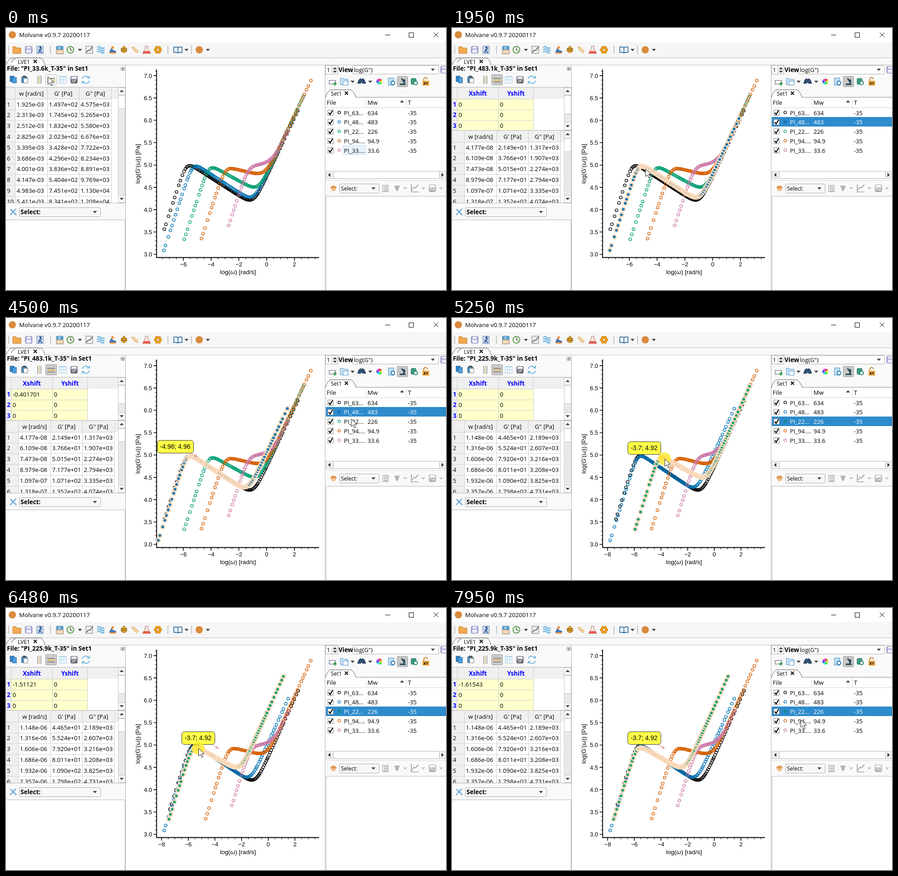
An HTML page with a canvas that plays this animation: 970x577 px, repeating every 8000 ms.

```html
<!DOCTYPE html>
<html lang="en">
<head>
<meta charset="utf-8">
<title>Rheology plot</title>
<style>
html,body{margin:0;width:100%;height:100%;overflow:hidden;background:#fff}
svg,canvas{position:absolute;left:0;top:0}
svg svg{overflow:hidden}
text{font:13.2px "Open Sans","Noto Sans",sans-serif;white-space:pre}
.b{font-weight:700;font-size:13.5px}
.s{font-size:12px}
.t{font-size:8px;font-weight:700}
.m{text-anchor:middle}
.e{text-anchor:end}
.blue{fill:#00f}
.white{fill:#fff}
.p{font:13px "Liberation Sans",Arial,sans-serif}
.l{font-size:13.5px}
.n{font-size:14px}
</style>
</head>
<body>
<template id="file4">
1.925e-03 1.497e+02 4.575e+03
2.313e-03 1.745e+02 5.265e+03
2.512e-03 1.832e+02 5.580e+03
2.825e-03 2.023e+02 6.676e+03
3.395e-03 3.428e+02 7.722e+03
3.686e-03 4.296e+02 8.234e+03
4.001e-03 3.836e+02 8.891e+03
4.147e-03 5.404e+02 9.769e+03
4.983e-03 7.451e+02 1.130e+04
5.411e-03 8.341e+02 1.208e+04
</template>
<template id="file1">
4.177e-08 2.149e+01 1.317e+03
6.109e-08 3.766e+01 1.907e+03
7.473e-08 5.015e+01 2.274e+03
8.979e-08 7.177e+01 2.794e+03
1.097e-07 1.071e+02 3.335e+03
1.318e-07 1.352e+02 4.074e+03
</template>
<template id="file2">
1.148e-06 4.465e+01 2.189e+03
1.316e-06 5.524e+01 2.607e+03
1.606e-06 7.920e+01 3.216e+03
1.686e-06 8.011e+01 3.208e+03
1.932e-06 1.090e+02 3.825e+03
2.357e-06 1.798e+02 4.731e+03
</template>
<svg width="970" height="577"><g id="ui"></g><g id="table"></g><g id="list"></g><g id="axis"></g></svg>
<canvas id="plot" width="970" height="577"></canvas>
<svg id="over" width="970" height="577"></svg>
<script>
const $ = id => document.getElementById(id);
const T = (x, y, s, c = '', a = '') => `<text x="${x}" y="${y}" class="${c}" ${a}>${s}</text>`;
const R = (x, y, w, h, f = 'none', s = 'none', r = 0) =>
  `<rect x="${x}" y="${y}" width="${w}" height="${h}" rx="${r}" fill="${f}" stroke="${s}"/>`;
const P = (d, s = '#000', w = 1, f = 'none') => `<path d="${d}" fill="${f}" stroke="${s}" stroke-width="${w}"/>`;
const C = (x, y, r, f = 'none', s = 'none', w = 1) =>
  `<circle cx="${x}" cy="${y}" r="${r}" fill="${f}" stroke="${s}" stroke-width="${w}"/>`;
const rep = (n, f) => Array.from({length: n}, (_, i) => f(i)).join('');
const down = (x, y, f = '#444') => P(`M${x - 4.5} ${y - 2}h9l-4.5 5z`, 'none', 0, f);
const up = (x, y, f = '#444') => P(`M${x - 4.5} ${y + 2}h9l-4.5-5z`, 'none', 0, f);
const grip = x => P(`M${x} 39v18`, '#c4c4c4', 2);
const cross = (x, y, n, w = 1) => P(`M${x} ${y}l${n} ${n}m0-${n}l-${n} ${n}`, '#000', w);
const line = (d, c = '#b4b4b4') => P(d, c);
const combo = (x, y, w, h, f = '#f8f8f8') => R(x + .5, y + .5, w, h, f, '#acacac', 2) + down(x + w - 12, y + h / 2);
const disk = (x, y, s = '', f = '#b5b5e2', ink = '#7474a8') => R(x - 7.5, y - 7.5, 15, 15, f, ink, 2) +
  R(x - 4, y - 7, 8, 4, '#fff') + (s ? R(x - 6, y - 1, 12, 8, ink) + T(x, y + 6, s, 't m white') : R(x - 5, y, 10, 7, '#eef'));

const COLORS = ['#000', '#0072b2', '#009e73', '#d55e00', '#cc79a7'];
const MASS = ['634', '483', '226', '94.9', '33.6'];
const NAMES = ['PI_63...', 'PI_48...', 'PI_22...', 'PI_94....', 'PI_33....'];
const FILES = {4: '33.6', 1: '483.1', 2: '225.9'};

// per curve: first x, last x, foot of the rise, plateau height, plateau slope, foot of the glassy rise
const MELTS = [
  [349, 647, 346.7, 360.6, .64, 614.5],
  [348, 638, 361, 353.5, .65, 612],
  [393, 658, 398, 329.3, .55, 612],
  [431, 674, 435.5, 309, .25, 612],
  [491, 625, 486, 307, -.1, 614]
];
const soft = (a, b, k) => Math.max(a, b) + k * Math.log1p(Math.exp(-Math.abs(a - b) / k));

function sample([x0, x1, foot, level, slope, glassy], i) {
  const height = x => {
    const rise = 450 - 3.05 * (x - foot);
    const plateau = level + slope * (x - 500);
    const glass = 243 - 2.12 * (x - glassy);
    return soft(rise, -soft(-plateau, -glass, 20), 18);
  };
  let seed = 911 + 77 * i;
  const rnd = () => (seed = (seed * 16807) % 2147483647) / 2147483647;
  const pts = [];
  for (let x = x0; x <= x1;) {
    pts.push([(x - 574.6) / 30.6, height(x)]);
    const end = Math.max(0, Math.abs((x - x0) / (x1 - x0) - .5) - .25) * 4;
    x += (2.2 + 2.8 * end) * (.7 + .6 * rnd());
  }
  return pts;
}
const CURVES = MELTS.map(sample);

function mainBar() {
  let s = R(0, 0, 970, 577, '#f9f9f9') + R(0, 0, 970, 31, '#fff') + R(0, 31, 970, 34, '#f6f6f6');
  s += C(14, 15, 8, '#d98a3c') + T(29, 20, 'Molvane v0.9.7 20200117');
  s += P('M836 15.5h11') + R(888.5, 10.5, 10, 10, 'none', '#000') + cross(943, 10, 10);
  s += line('M0 65.5h970M0 81.5h970', '#c2c2c2') + [6, 98, 357, 409].map(grip).join('');
  s += P('M15 41h7l2 3h9v12h-18z', '#c07a28', 1, '#f2a950') + disk(50, 48);
  s += R(68, 40, 14, 16, '#cfdcf0', '#5b7fae') + C(76, 43, 2.3, '#234a86') + P('M79 46l-5 2-2 7m2-7l5 7', '#234a86', 2);
  s += R(111, 40, 15, 7, '#58a6d8', '#3a7ca8', 2) + R(111, 48, 15, 9, '#f2dcc0', '#8a6b50') + T(118, 47, 'C', 't m white');
  s += C(142, 48, 7.5, '#edf5e8', '#5e9a52', 2) + P('M142 43v5l4 2', '#333', 1.3);
  s += R(176, 40, 15, 16, '#eee', '#777') + P('M177 54l4-5h4l6-8', '#444', 1.5);
  s += rep(3, i => P(`M201 ${43 + 5 * i}q4-4 8 0t8 0`, '#78bbe0', 3));
  s += P('M228 54l4-9 4 4 6 2v4z', '#345c99', 1, '#3f79b8') + C(235, 43, 3, '#ef9440') + P('M229 55h13', '#ef9440', 3);
  s += C(260, 48, 6.5, '#efb02e', '#99641c') + P('M254 46h12M254 50h12M260 39v3', '#8a6420', 2);
  s += P('M277 42h5l10 9-3 4-7-5z', '#d8a660', 1, '#f3d49b');
  s += P('M307 40h6v5l6 11h-18l6-11z', '#a77', 1, '#f6e5dd') + P('M304 51h12l3 5h-18z', 'none', 0, '#e8594a');
  s += rep(6, i => C(335 + 5.5 * Math.cos(i * 1.05), 48 + 5.5 * Math.sin(i * 1.05), 3.2, '#f0a21c', '#c98220'));
  s += P('M370 42q5-1 9 1 4-2 9-1v12q-5-1-9 1-4-2-9-1zM379 43v12', '#2c6696', 1.6, '#eaf4fc');
  s += C(426, 48, 8, '#d98a3c') + [163, 398, 445].map(x => down(x, 48)).join('');
  s += P('M0 82V81Q7 66 14 66H76Q82 67 86 82', '#555', 1, '#fff') + P('M12 77q2-8 9-9', '#888', 1.4);
  return s + T(26, 79, 'LVE1', 's') + cross(61, 70, 7, 1.8);
}

function leftDock() {
  let s = line('M263.5 82v495') + R(253.5, 86.5, 8, 7, '#fff', '#777', 2) + cross(255.5, 88, 4);
  s += R(9, 106, 9, 12, '#2f83c8', '#1f5f98') + R(14, 109, 9, 12, '#4da0df', '#1f5f98');
  s += R(34.5, 107.5, 12, 13, '#4a91ca', '#356', 1) + R(39, 111, 9, 10, '#fff', '#777') + R(37, 105, 7, 4, '#555');
  s += P('M70 105v18M77 105v18', '#aaa', 2) + P('M73.5 105v18', '#d5c089', 2);
  s += R(117.5, 106.5, 15, 15, '#fff', '#9bc5e2') + P('M118 108h15M118 114h15M122.5 107v15M127.5 107v15', '#b5d8ee', 1.3);
  s += disk(150, 114, 'SF', '#c3c3dc', '#555');
  s += P('M168 112a8 8 0 0 1 14-3m2-4v5h-5M184 116a8 8 0 0 1-14 3m-2 4v-5h5', '#6ab2dd', 1.8);
  s += P('M10 399l13 13M22 398l-13 14', '#6aa8d6', 2.5) + combo(29, 395, 179, 20) + T(32, 410, 'Select:', 'b');
  return s + R(-.5, 422.5, 263, 160, '#fff', '#b4b4b4');
}

function rightDock() {
  let s = R(264, 82, 439, 495, '#fff') + line('M703.5 82v495');
  s += R(704.5, 82.5, 27, 19, '#fff', '#aaa') + T(707, 97, '1') + line('M718.5 83v19') + up(725, 89) + down(725, 96);
  s += T(733, 97, 'View', 'b') + combo(764, 82, 189, 19, '#fff') + T(767, 97, 'log(G")') + disk(966, 92);
  s += R(712.5, 115.5, 14, 8, '#fff', '#557') + P('M725 119v8m-4-4h8', '#2c9c45', 2.5);
  s += P('M737 111h6l2 2h9v12h-17z', '#4c91c8', 1, '#cbe4f6') + R(743, 117, 11, 9, '#fff', '#4c91c8');
  s += P('M778 114l4-3 2 3 2-3 4 3 3 8h-7l-2-4-2 4h-7z', '#1c2f48', 1, '#2f4f76') + down(764, 118) + down(803, 118);
  s += rep(6, i => `<path d="M823 118v-6.5a6.5 6.5 0 0 1 5.6 3.25z" fill="hsl(${60 * i} 75% 58%)" transform="rotate(${60 * i} 823 118)"/>`);
  s += R(843, 110, 12, 16, '#bfe0f6', '#4791c4') + C(853, 121, 4, '#fff', '#2676ac', 2);
  s += R(862.5, 106.5, 23, 23, '#c8c8c8', '#9a9a9a', 2) + P('M872 111l5 7M868 124h13M876 122q5-4 1-9', '#245', 3);
  s += R(893, 111, 11, 13, '#3e9c83', '#22705c', 2) + C(903, 121, 4, '#fff', '#2a806a', 2);
  s += P('M921 116v-3a4 4 0 0 1 8 0', '#c58a32', 2) + R(918, 116, 15, 11, '#f4b04d') + T(925.5, 125, 'XY', 't m');

  s += line('M704 152.5h266', '#888') + P('M704 153Q710 136 717 136H759Q766 137 772 153', '#555', 1, '#fff');
  s += T(716, 149, 'Set1', 's') + cross(747, 140, 7, 1.8) + R(705, 153, 265, 163, '#fff');
  s += line('M705 175.5h265M793.5 154v21M882.5 154v21', '#d5d5d5') + up(873, 162);
  s += T(707, 169, 'File') + T(797, 169, 'Mw') + T(886, 169, 'T');
  s += R(705.5, 315.5, 265, 16, '#f0f0f0', '#c5c5c5') + R(721.5, 315.5, 234, 16, '#fff', '#b8b8b8');
  s += P('M715 319v9l-5-4.5zM960 319v9l5-4.5z', 'none', 0, '#333') + line('M705 335.5h265', '#dcdcdc');

  s += C(722, 354, 5.5, '#f2bd8a') + P('M715 353a7 6 0 0 1 14 0z', 'none', 0, '#dd9c55');
  s += combo(735, 343, 87, 20) + T(738.5, 358, 'Select:', 's');
  s += R(830.5, 346.5, 12, 14, '#fff', '#888') + P('M833 350h8M833 354h8M833 358h8', '#888', 1.5);
  s += P('M856 347h12l-3 9-3 4-3-4z', 'none', 0, '#b5b5b5') + P('M893.5 344v17h16M895 357l4-6 4 1 6-7', '#777', 1.2);
  s += disk(940, 353, 'TH', '#e4e4e4', '#a0a0a0') + [880, 920, 959].map(x => down(x, 353, '#c4c4c4')).join('');
  return s + R(705.5, 370.5, 270, 212, '#fff', '#b4b4b4');
}

function bar(y, h, size) {
  const box = (top, tall, f) => R(247.5, top + .5, 15, tall, f, '#c4c4c4');
  return box(y, h - 1, '#e9e9e9') + box(y, 16, '#f8f8f8') + box(y + h - 17, 16, '#f8f8f8') +
    up(255, y + 8) + down(255, y + h - 9) + box(y + 17, size, '#fff');
}

// a grid with a header row and a header column, clipped to its height
function grid(y0, h, edges, heads, rows, fill, cls) {
  const right = edges[edges.length - 1];
  let s = R(0, 0, 247, h, '#fff') + R(0, 0, 247, 25, '#f0f0f0') + R(0, 25, edges[0], h, '#f0f0f0') +
    R(edges[0], 25, right - edges[0], h, fill);
  heads.forEach((t, j) => s += T((edges[j] + edges[j + 1]) / 2, 18, t, 'm ' + cls));
  rows.forEach((row, i) => {
    const y = 41.5 + 23.8 * i;
    s += T(2, y, i + 1, cls) + line(`M0 ${Math.round(y + 7) + .5}H${right}`, '#d2d2d2');
    row.forEach((v, j) => s += T(edges[j] + 3, y, v));
  });
  s += line(`M0 25.5H${right}` + edges.map(x => `M${x} 0v${h}`).join(''), '#ccc');
  return `<svg x="0" y="${y0}" width="247" height="${h}">${s}</svg>` + line(`M0 ${y0 + h + .5}h263`);
}

function drawTable({sel, open, press, shift}) {
  const y0 = open ? 226 : 131, c0 = sel === 4 ? 20.5 : 27.5, on = open || press;
  const rows = $('file' + sel).innerHTML.trim().split('\n').map(r => r.split(' '));
  let s = T(2, 94, `File: "PI_${FILES[sel]}k_T-35" in Set1`, 'b');
  s += R(87.5, 102.5, 24, 23, on ? '#cbcbcb' : '#f7f7f7', on ? '#999' : '#bbb', 2);
  s += P('M91 111h17M91 119h17', '#888', 2) + P('M91 115h17', '#e0c063', 3) + line('M0 130.5h263');
  s += grid(y0, 385 - y0, [0, 1, 2, 3].map(j => c0 + Math.round(70.5 * j)), ['w [rad/s]', "G' [Pa]", "G'' [Pa]"], rows, '#fff', '');
  s += bar(y0, 385 - y0, 29);
  if (open) {
    const first = shift ? shift.toPrecision(6) : 0;
    s += grid(131, 94, [11.5, 102.5, 179.5], ['Xshift', 'Yshift'], [[first, 0], [0, 0], [0, 0]], '#ffffcc', 'b blue') + bar(131, 94, 40);
  }
  $('table').innerHTML = s;
}

function drawList(sel) {
  $('list').innerHTML = rep(5, i => {
    const y = 186.5 + 20.75 * i, on = sel === i && i < 4, c = on ? 'white' : '';
    return (on ? R(705, Math.floor(y - 10.5), 265, 21, '#2e8bcc') : '') +
      (sel === 4 && i === 4 ? R(742.5, 259.5, 51, 19, '#e8f4fd', '#c0dcf0') : '') +
      R(709.5, y - 6, 12, 12, '#fff', '#888') + P(`M711.5 ${y}l3 4 5.5-9`, '#000', 2.2) +
      C(734.5, y - .5, 2.9, on ? '#2478b0' : 'none', COLORS[i], 1.3) +
      T(745, y + 5, NAMES[i], c) + T(797, y + 5, MASS[i], c) + T(886, y + 5, '-35', c);
  });
}

function drawAxis(x0, sx) {
  let s = P('M332 91.5V505.5H690', '#000', 1.8), major = '', minor = '';
  for (let i = 0; i <= 41; i++) {
    const y = 498.5 - 9.84 * i;
    if (i % 5) minor += `M332 ${y}h-3.5`;
    else { major += `M332 ${y}h-6.5`; s += T(322, y + 4.7, (3 + i / 10).toFixed(1), 'p e'); }
  }
  for (let v = -8; v <= 3.5; v += .5) {
    const x = x0 + v * sx;
    if (x < 333) continue;
    if (v % 2) minor += `M${x} 506v3.5`;
    else { major += `M${x} 506v6.5`; s += T(x, 525, String(v).replace('-', '−'), 'p m'); }
  }
  const w = '<tspan font-style="italic">ω</tspan>';
  s += P(major, '#000', 1.6) + P(minor) + T(511.5, 542, `log(${w}) [rad/s]`, 'p l m') +
    T(0, 0, `log(G'(${w})) [Pa]`, 'p l m', 'transform="translate(295 299) rotate(-90)"');
  $('axis').innerHTML = s;
}

const ctx = $('plot').getContext('2d');
function drawCurves(x0, sx, sel, shifts) {
  ctx.clearRect(0, 0, 970, 577);
  const rank = i => i === sel ? 9 : i;
  for (const i of [0, 1, 2, 3, 4].sort((a, b) => rank(a) - rank(b))) {
    const lit = i === sel && sel < 4;
    ctx.lineWidth = lit ? 2.8 : 1.3;
    ctx.strokeStyle = lit ? '#fcdabb' : COLORS[i];
    ctx.fillStyle = COLORS[i];
    for (const [v, y] of CURVES[i]) {
      ctx.beginPath();
      ctx.arc(x0 + (v + shifts[i]) * sx, y, lit ? 4.3 : 3.1, 0, 7);
      if (lit) ctx.fill();
      ctx.stroke();
    }
  }
}

function note(x, y, w, s, tx, ty) {
  return P(`M${x + w - 6} ${y + 28}L${tx} ${ty}m-7-1.5l7 1.5-4.5-5.5`, '#d0716a') +
    R(x + .5, y + .5, w, 28, '#ffff48', '#333', 6) + T(x + w / 2, y + 18.5, s, 'p n m');
}

function drawOver({x, y, halo, tip}) {
  let s = '';
  if (tip === 1) s += note(333, 269, 80, '-4.96; 4.96', 422, 305.5);
  if (tip === 2) s += note(387, 272, 73, '-3.7; 4.92', 468.5, 309.5);
  if (halo) s += `<circle cx="${x}" cy="${y}" r="14" fill="#ffe926" opacity=".78"/>`;
  s += P(`M${x + .5} ${y + .5}v16.5l4-3.7 3 6.7 3-1.3-3-6.5h5.5z`, '#222', 1, '#fff');
  $('over').innerHTML = s;
}

// glides: start, end, then the values reached; the screen refreshes about every 80 ms
const MOUSE = [
  [330, 770, 772, 207], [1160, 1950, 426, 310], [1950, 2410, 424, 304],
  [2640, 2950, 414, 304], [2950, 3180, 411.5, 304], [3570, 4210, 760.5, 222],
  [4590, 5100, 468.5, 310], [5250, 5930, 438.5, 312], [5930, 6480, 424, 309],
  [6480, 7100, 421, 309], [7510, 7950, 768.5, 246]
];
const BLUE = [[2640, 2950, -.326382], [2950, 3180, -.401701]];
const GREEN = [[5250, 5930, -1.01616], [5930, 6480, -1.51121], [6480, 7100, -1.61543]];
const PRESSED = [[180, 260], [940, 1010], [2490, 3490], [4430, 4500], [5250, 7400]];

function glide(rows, t, from) {
  for (const [a, b, ...to] of rows) {
    if (t <= a) break;
    const n = Math.round((b - a) / 80);
    const p = Math.min(1, Math.floor((t - a) / (b - a) * n + 1e-6) / n);
    from = from.map((v, i) => v + (to[i] - v) * p);
  }
  return from;
}

let last = '';
function render(t) {
  const sel = t < 1160 ? 4 : t < 4590 ? 1 : 2;
  const shifts = [0, ...glide(BLUE, t, [0]), ...glide(GREEN, t, [0]), 0, 0];
  const [x, y] = glide(MOUSE, t, [92, 107]);
  const st = {
    sel, shifts, shift: shifts[sel], open: t >= 260, press: t >= 180, x, y,
    halo: PRESSED.some(([a, b]) => t >= a && t < b),
    tip: t >= 5250 ? 2 : t >= 2720 && t < 4590 ? 1 : 0
  };
  const key = JSON.stringify(st);
  if (key === last) return;
  last = key;
  const [x0, sx] = sel === 2 ? [578.2, 29.4] : [574.6, 30.6];
  drawTable(st);
  drawList(sel);
  drawAxis(x0, sx);
  drawCurves(x0, sx, sel, shifts);
  drawOver(st);
}

$('ui').innerHTML = mainBar() + leftDock() + rightDock();
const start = performance.now();
(function tick() {
  render((performance.now() - start) % 8000);
  requestAnimationFrame(tick);
})();
</script>
</body>
</html>
```
